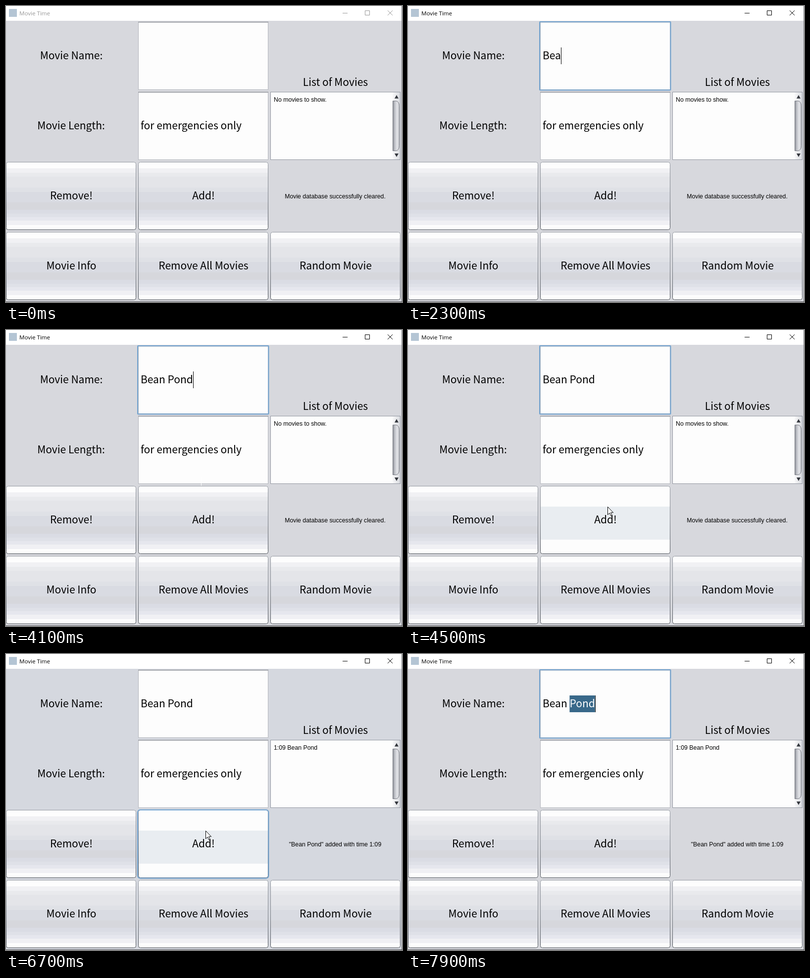
Write an HTML page that moves like this. It is 800 by 600 pixels and loops after 8000 ms.

```html
<!DOCTYPE html>
<html lang="en">
<head>
<meta charset="utf-8">
<title>Movie Time</title>
<style>
  html, body { margin: 0; width: 100%; height: 100%; overflow: hidden; }
  svg { display: block; }
  text { white-space: pre; }
  .big { font: 21px "Noto Sans CJK JP", "Noto Sans CJK SC", "Noto Sans", sans-serif; }
  .small { font: 12.3px "Liberation Sans", Arial, sans-serif; }
  .title { font: 11.6px "Open Sans", "Noto Sans", sans-serif; }
  .mid { text-anchor: middle; }
</style>
</head>
<body>
<svg id="stage" width="800" height="600" viewBox="0 0 800 600"></svg>
<script>
const LOOP = 8000;
const NAME = 'Bean Pond';
const WORD = NAME.indexOf(' ') + 1;
const NAME_X = 272;

// Button shading: [top offset, colour], flat bands over a height of 138.
const SHADES = {
  normal: [[0, '#fdfdfd'], [13, '#f1f1f4'], [22, '#e9eaed'], [30, '#e4e5e9'], [52, '#dfe1e6'],
    [61, '#d9dbe2'], [82, '#d6d7dc'], [97, '#dadce4'], [105, '#dfe1e8'], [112, '#e6e7ee'],
    [119, '#f0f0f4'], [128, '#fdfdfd']],
  hover: [[0, '#fdfdfd'], [42, '#e9edf1'], [109, '#fdfdfd']],
  down: [[0, '#bfc5cf'], [14, '#b7bdc8'], [34, '#b0b7c2'], [52, '#a8afba'], [70, '#a2a9b5'],
    [95, '#adb4bf'], [109, '#b9c1cd'], [119, '#c4cdda'], [130, '#d0d9e6']]
};

// Each row changes part of the state from its time on.
const STEPS = [
  [0, { active: false, cool: false, focus: '', typed: 0, caret: -1, select: false,
        add: 'normal', clear: 'normal', added: false, arrow: null, beam: null }],
  [400, { arrow: [632, 4] }],
  [500, { arrow: [608, 108] }],
  [600, { arrow: [570, 336] }],
  [700, { arrow: [532, 583] }],
  [800, { arrow: null }],
  [1500, { active: true, focus: 'name', caret: 0 }],
  [2000, { caret: -1 }],
  ...[...NAME].map((c, i) => [2100 + i * 100, { typed: i + 1, caret: i + 1 }]),
  [3400, { caret: -1 }],
  [3800, { arrow: [412, 588] }],
  [3900, { arrow: [404, 500], clear: 'hover', caret: NAME.length }],
  [4000, { arrow: [397, 372], clear: 'normal', add: 'hover' }],
  [4100, { arrow: null, add: 'normal', beam: [394, 298] }],
  [4200, { beam: null, arrow: [396, 322], add: 'hover' }],
  [4300, { arrow: [400, 342] }],
  [4400, { arrow: [402, 353], caret: -1 }],
  [4500, { arrow: [403, 358] }],
  [4700, { add: 'down', focus: 'add', cool: true }],
  [6700, { add: 'hover', added: true }],
  [7100, { arrow: [402, 346] }],
  [7200, { arrow: [398, 322] }],
  [7300, { arrow: null, add: 'normal', beam: [392, 240] }],
  [7400, { beam: [388, 153] }],
  [7800, { beam: null, focus: 'name', caret: WORD + 2, cool: false }],
  [7900, { select: true, caret: NAME.length }]
];

const rect = (x, y, w, h, fill, extra = '') =>
  `<rect x="${x}" y="${y}" width="${w}" height="${h}" fill="${fill}" ${extra}/>`;
const text = (cls, x, y, s, id = '') =>
  `<text class="${cls}" x="${x}" y="${y}" ${id && `id="${id}"`}>${s}</text>`;

function shade(name, bands) {
  const stops = bands.map(([y, c], i) => {
    const end = i + 1 < bands.length ? bands[i + 1][0] : 138;
    return `<stop offset="${y / 138}" stop-color="${c}"/><stop offset="${end / 138}" stop-color="${c}"/>`;
  });
  return `<linearGradient id="${name}" x2="0" y2="1">${stops.join('')}</linearGradient>`;
}

function fade(id, dir, ...colors) {
  const stops = colors.map((c, i) => `<stop offset="${i / (colors.length - 1)}" stop-color="${c}"/>`);
  return `<linearGradient id="${id}" ${dir}>${stops.join('')}</linearGradient>`;
}

const button = (x, y, label, id = '') =>
  rect(x + .5, y + .5, 262, 137, 'url(#normal)', `rx="4" stroke="url(#edge)" ${id && `id="${id}"`}`) +
  text('big mid', x + 132, y + 76, label);

const field = y =>
  rect(267.5, y + .5, 262, 137, '#fdfdfd', 'stroke="#b4b7bd"') +
  rect(267, y, 263, 1, '#85888e') +
  rect(268, y + 1, 261, 1, '#d3d5d9') + rect(268, y + 2, 261, 1, '#f1f1f3');

const ring = (id, y, h, rx) =>
  rect(266, y, 264.5, h, 'none', `id="${id}" rx="${rx}" stroke="#73a4d1" stroke-width="2"`);

const stage = document.getElementById('stage');
stage.innerHTML = `
  <defs>
    ${Object.entries(SHADES).map(([k, v]) => shade(k, v)).join('')}
    ${fade('edge', 'x2="0" y2="1"', '#959aa2', '#7d828a', '#4a4f57')}
    ${fade('thumb', '', '#8d9097', '#c3c5cb', '#e3e4e8', '#c5c7cd')}
    ${fade('cap', '', '#f8f8f9', '#d9dbe0')}
  </defs>
  ${rect(0, 0, 800, 600, '#d7d8dd', 'id="panel"')}
  ${rect(0, 0, 800, 30, '#fff')}
  ${rect(6, 6, 16, 16, '#b4c5d4')}
  <g id="chrome">
    ${text('title', 27, 19, 'Movie Time')}
    <path d="M680 14.5h10M725.5 9.5h9v9h-9zM771 9l10 10M781 9l-10 10" fill="none" id="controls"/>
  </g>
  ${text('big mid', 132, 108, 'Movie Name:')}
  ${text('big mid', 131.5, 250, 'Movie Length:')}
  ${text('big mid', 665.5, 162, 'List of Movies')}
  ${field(32)}${ring('nameRing', 32, 138.5, 1)}
  ${field(174)}${text('big', NAME_X, 250, 'for emergencies only')}
  ${rect(0, 84, 0, 34, '#39698a', 'id="mark"')}
  <text class="big" x="${NAME_X}" y="108" id="name"><tspan id="head"></tspan><tspan id="tail"></tspan></text>
  ${rect(0, 84, 1, 34, '#000', 'id="caret"')}

  ${rect(534.5, 174.5, 262, 137, '#fdfdfd', 'stroke="#9297a1"')}
  ${rect(781, 175, 15, 136, '#dcdde1')}
  ${rect(781, 175, 15, 17, 'url(#cap)')}${rect(781, 294, 15, 17, 'url(#cap)')}
  <path d="M781.5 192.5h6q7 1 7 10v81q0 9-7 10h-6z" fill="url(#thumb)" stroke="#777a82"/>
  <path d="M785 187.500l4-7 4 7zM785 299l4 7 4-7z" fill="#33363c"/>
  ${text('small', 541, 194, '', 'list')}
  ${text('small mid', 665, 390, '', 'status')}

  ${button(0, 316, 'Remove!')}
  ${button(267, 316, 'Add!', 'add')}
  ${ring('addRing', 316, 138.5, 5)}
  ${button(0, 458, 'Movie Info')}
  ${button(267, 458, 'Remove All Movies', 'clear')}
  ${button(534, 458, 'Random Movie')}
  ${rect(799, 0, 1, 600, '#85878b')}
  ${rect(0, 599, 800, 1, '#4b4c50')}
  ${rect(0, 0, 1, 18, '#fff', 'id="beam"')}
  <path id="arrow" d="M.5.5v16l3.700-3.500 2.600 5.800 2.400-1-2.600-5.700h5z" fill="#fff" stroke="#000"/>`;

const part = Object.fromEntries([...stage.querySelectorAll('[id]')].map(e => [e.id, e]));
const set = (id, attrs) => {
  for (const k in attrs) part[id].setAttribute(k, attrs[k]);
};
const show = (id, on) => set(id, { visibility: on ? 'visible' : 'hidden' });
const place = (id, pos) => {
  show(id, pos);
  if (pos) set(id, { transform: `translate(${pos})` });
};
const nameX = n => NAME_X + (n > 0 ? part.name.getSubStringLength(0, n) : 0);

function stateAt(t) {
  return Object.assign({}, ...STEPS.filter(([at]) => at <= t).map(([, change]) => change));
}

function draw(t) {
  const s = stateAt(t);
  const ink = s.active ? '#000' : '#999';
  set('panel', { fill: s.cool ? '#d5d8df' : '#d7d8dd' });
  set('chrome', { fill: ink });
  set('controls', { stroke: ink });

  const split = s.select ? WORD : s.typed;
  part.head.textContent = NAME.slice(0, split);
  part.tail.textContent = NAME.slice(split, s.typed);
  set('tail', { fill: '#fff' });
  show('mark', s.select);
  if (s.select) set('mark', { x: nameX(WORD), width: nameX(s.typed) - nameX(WORD) });
  show('caret', s.caret >= 0);
  if (s.caret >= 0) set('caret', { x: Math.round(nameX(s.caret)) });

  show('nameRing', s.focus === 'name');
  show('addRing', s.focus === 'add');
  set('add', { fill: `url(#${s.add})`, stroke: s.add === 'down' ? '#1d2733' : 'url(#edge)' });
  set('clear', { fill: `url(#${s.clear})` });

  part.list.textContent = s.added ? `1:09 ${NAME}` : 'No movies to show.';
  part.status.textContent = s.added
    ? `"${NAME}" added with time 1:09`
    : 'Movie database successfully cleared.';
  place('arrow', s.arrow);
  place('beam', s.beam);
}

const start = performance.now();
function tick() {
  draw((performance.now() - start) % LOOP);
  requestAnimationFrame(tick);
}
tick();
</script>
</body>
</html>
```
